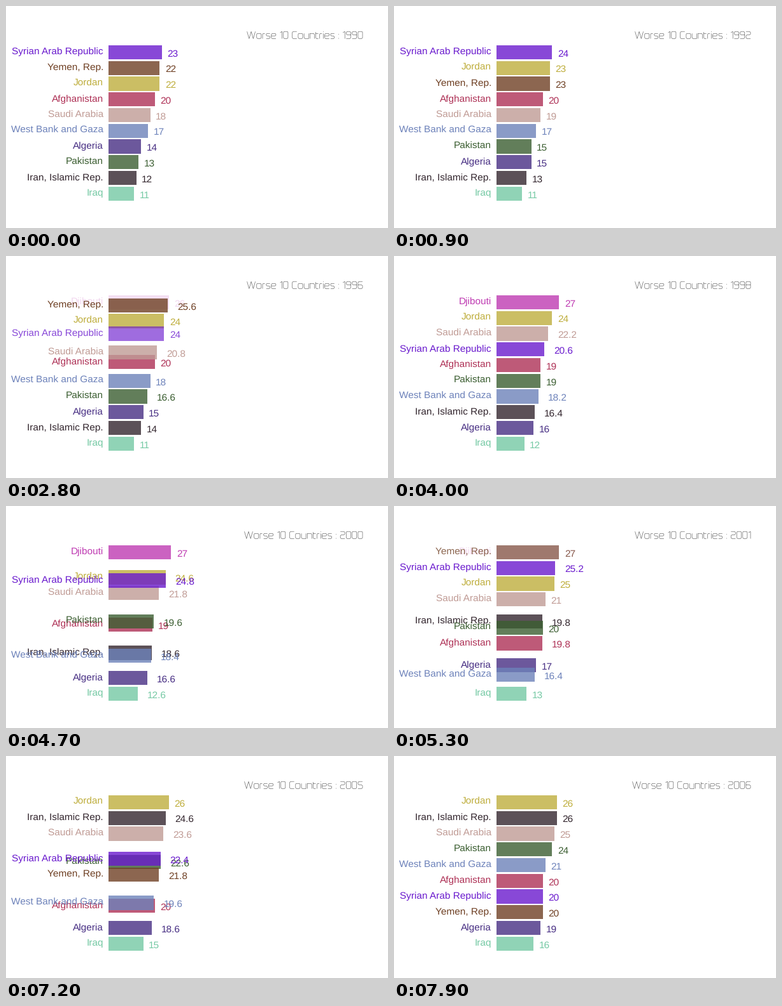
Write a matplotlib script that moves like this. It is 600 by 350 pixels and loops after 8 s.

```python
import numpy as np
import matplotlib.pyplot as plt
from matplotlib.animation import FuncAnimation
from matplotlib.patches import PathPatch, Rectangle
from matplotlib.path import Path

plt.rcParams.update({"font.family": "Liberation Sans", "text.hinting": "none"})

W, H, DPI = 600, 350, 100
FRAMES, INTERVAL = 80, 100
START, YEARS, SHOWN = 1990, 17, 10

X0, UNIT = 161, 3.645         # bar origin, pixels per percent
TOP, STEP, BAR = 61.75, 24.78, 22.2
FONT = 15.36                  # label size in pixels

countries = {}


def country(name, color, **points):
    """Yearly rates, straight between turning points such as y4=17.9."""
    x = [int(k[1:]) for k in points]
    rates = np.interp(range(YEARS), x, list(points.values()))
    countries[name] = color, rates


country("Afghanistan", "#ae3156", y0=20, y6=20, y8=19.1, y16=20.3)
country("Algeria", "#472e83", y0=14.2, y6=15.2, y16=19)
country("Djibouti", "#bf3bb2", y0=25.2, y16=28.4)
country("Iran, Islamic Rep.", "#33262e", y0=12, y6=14, y9=17.6, y16=26.4)
country("Iraq", "#75c9a4", y0=11, y6=11.3, y10=12.6, y16=16)
country("Jordan", "#bfae3d", y0=22, y4=24.3, y9=24.2, y16=26.45)
country("Pakistan", "#3b5e31",
        y0=13, y4=17.9, y5=15.4, y8=18.8, y11=20, y16=23.6)
country("Saudi Arabia", "#c09b95",
        y0=18, y5=19.8, y9=23.1, y10=21, y12=21.4, y16=25)
country("Syrian Arab Republic", "#6a1ace",
        y0=23.3, y4=25, y5=27, y6=23.6, y8=20.2, y10=25.6, y13=24.6, y16=20.1)
country("West Bank and Gaza", "#6d82ba",
        y0=17, y9=18.6, y11=16.45, y13=18.6, y16=21)
country("Yemen, Rep.", "#6f4024", y0=22.4, y4=23.3, y8=28, y10=28, y16=19.9)


def standings(year):
    """Lowest rates of a year as {name: (rank, rounded rate)}, highest first."""
    rates = {n: r[year] for n, (_, r) in countries.items()}
    order = sorted(rates, key=rates.get)[:SHOWN][::-1]
    return {n: (i, round(rates[n])) for i, n in enumerate(order)}


tables = [standings(y) for y in range(YEARS)]


# Thin square title lettering. Strokes join the anchors of a cell:
# a b top, c d middle, e f bottom, g h above the cell, x y on the left edge.
CAP, XH, GAP, SPACE, BASE, RIGHT = 11.3, 8.2, 2.15, 4.6, 51.5, 560
SHAPES = {
    "C": "baef", "o": "abfea", "r": "eab", "s": "bacdfe", "e": "cdbaef",
    "u": "aef bf", "n": "ea abf", "t": "gef ab", "i": "ea gh", ":": "ex gh",
    "0": "abfea", "1": "ybf", "2": "abdcef", "3": "abfe cd", "4": "acd bf",
    "5": "bacdfe", "6": "baefdc", "7": "abe", "8": "abfea cd", "9": "dcabfe",
}
WIDTHS = {"W": 13, "r": 3.6, "s": 5.9, "t": 3.9, "i": 0, ":": 0, "1": 3}


def glyph(ch):
    """Width and strokes of a character, y up from the baseline."""
    w = WIDTHS.get(ch, 7.1)
    h = XH / 2 if ch == ":" else CAP if ch.isupper() or ch.isdigit() else XH
    if ch == "W":
        return w, [[(w * i / 4, h * (i % 2 == 0)) for i in range(5)]]
    at = dict(a=(0, h), b=(w, h), c=(0, h * .53), d=(w, h * .53),
              e=(0, 0), f=(w, 0), g=(0, h + 2.2), h=(0, h + 3.2),
              x=(0, 1), y=(0, h * .85))
    return w, [[at[k] for k in s] for s in SHAPES[ch].split()]


def stroke(points, radius=2.4):
    """Path through points, rounding corners that are close to square."""
    p = np.array(points, float)
    if (p[0] == p[-1]).all():
        mid = (p[0] + p[1]) / 2
        p = np.vstack([mid, p[1:], mid])
    verts, codes = [p[0]], [Path.MOVETO]
    for a, b, c in zip(p, p[1:], p[2:]):
        la, lc = np.hypot(*(a - b)), np.hypot(*(c - b))
        u, v = (a - b) / la, (c - b) / lc
        if abs(u @ v) < .4:
            r = min(radius, la / 2, lc / 2)
            verts += [b + u * r, b, b + v * r]
            codes += [Path.LINETO, Path.CURVE3, Path.CURVE3]
        else:
            verts.append(b)
            codes.append(Path.LINETO)
    return Path(verts + [p[-1]], codes + [Path.LINETO])


def title_path(text):
    x, paths = 0, []
    for ch in text:
        if ch == " ":
            x += SPACE
            continue
        w, lines = glyph(ch)
        paths += [stroke([(x + px, BASE - py) for px, py in s]) for s in lines]
        x += w + GAP
    path = Path.make_compound_path(*paths)
    path.vertices[:, 0] += RIGHT - (x - GAP)
    return path


fig = plt.figure(figsize=(W / DPI, H / DPI), dpi=DPI, facecolor="white")
ax = fig.add_axes([0, 0, 1, 1])


def timeline(frame):
    """Year index and progress to the next year; the first step is shorter."""
    if frame < 4:
        return 0, frame / 4
    return (frame + 1) // 5, (frame + 1) % 5 / 5


def blend(name, year, u):
    """Rank, rate and opacity of a country between two years."""
    a = tables[year].get(name)
    b = tables[min(year + 1, YEARS - 1)].get(name)
    if a and b:
        return a[0] + (b[0] - a[0]) * u, a[1] + (b[1] - a[1]) * u, 1
    if a:
        return *a, 1 - u
    if b:
        return *b, u
    return 0, 0, 0


def draw(frame):
    ax.clear()
    ax.set(xlim=(0, W), ylim=(H, 0))
    ax.axis("off")
    year, u = timeline(frame)

    for name, (color, _) in countries.items():
        rank, rate, alpha = blend(name, year, u)
        if alpha <= 0:
            continue
        top, length = TOP + STEP * rank, UNIT * rate
        mid = top + BAR / 2
        ax.add_patch(Rectangle((X0, top), length, BAR, fc=color, lw=0,
                               alpha=.8 * alpha, zorder=1))
        style = dict(color=color, alpha=alpha, fontsize=FONT * 72 / DPI,
                     va="baseline")
        ax.text(153, mid + 3.4, name, ha="right", zorder=2, **style)
        # The gap before a value is half the value's own width.
        label = f"{round(rate, 2):g}"
        dots = label.count(".")
        width = FONT * (.556 * (len(label) - dots) + .278 * dots)
        ax.text(X0 + length + width / 2, mid + 6.7, label, ha="left",
                zorder=3, **style)

    nearest = START + year + (u >= .5)
    ax.add_patch(PathPatch(title_path(f"Worse 10 Countries : {nearest}"),
                           fill=False, ec="#606060", lw=.65 * 72 / DPI,
                           snap=False, zorder=4))
    return []


anim = FuncAnimation(fig, draw, frames=FRAMES, interval=INTERVAL,
                     init_func=lambda: [], repeat=True, repeat_delay=0)
plt.show()
```
